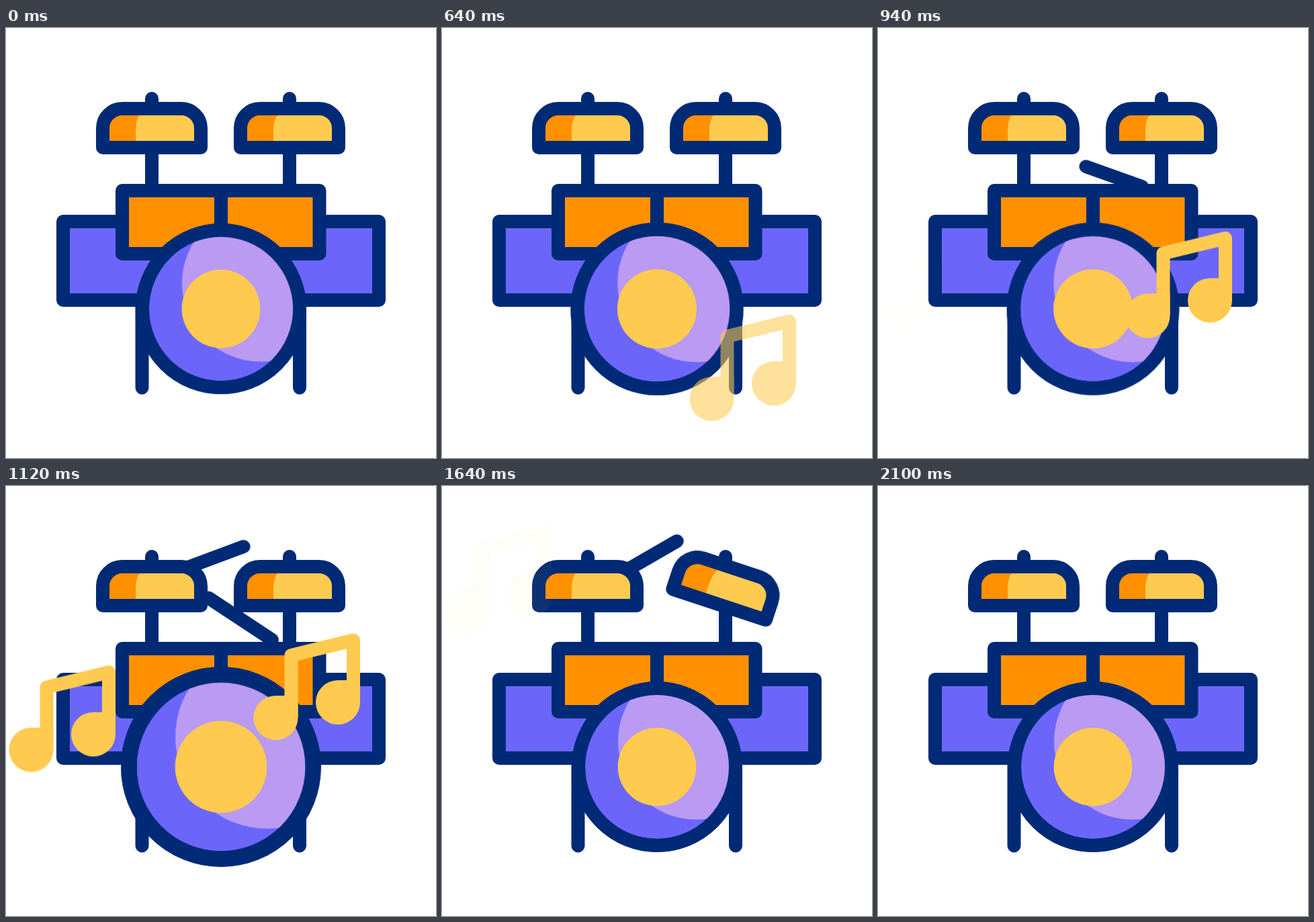
These frames come from a looping animation (640 px wide and 640 px high, 2400 ms). An HTML page:

```html
<!DOCTYPE html>
<html lang="en">
<head>
<meta charset="utf-8">
<title>Drum kit</title>
<style>
  html, body { margin: 0; width: 100%; height: 100%; overflow: hidden; background: #fff; }
  svg { display: block; width: 100%; height: 100%; }

  :root {
    --navy: #002a76;
    --yellow: #fecb50;
    --orange: #ff9100;
    --purple: #6b66f9;
    --lilac: #ba9af2;
    --smooth: cubic-bezier(.33, 0, .67, 1);
  }

  .line { stroke: var(--navy); stroke-width: 20; stroke-linecap: round; stroke-linejoin: round; }
  .tom { fill: var(--orange); }
  .side { fill: var(--purple); }

  .drum, .cymbal, .stick, .stick line, .note, .squash {
    animation: 2.4s var(--smooth) infinite both;
  }

  /* bass drum: three straight in-and-out beats */
  .drum { transform-origin: 320px 418px; animation-name: beat; animation-timing-function: linear; }
  @keyframes beat {
    0%, 13.333%, 26.25%, 39.583%, 52.917%, 100% { transform: scale(1); }
    6.667%, 32.917%, 46.25% { transform: scale(1.185); }
  }

  /* left tom gives way under the lower stick */
  .squash { animation-name: squash; }
  @keyframes squash {
    0%, 51.667%, 60%, 100% { y: 242px; height: 94px; }
    55.833% { y: 268px; height: 68px; }
  }

  /* right cymbal rocks and settles */
  .cymbal { transform-origin: 422px 148px; animation-name: rock; }
  @keyframes rock {
    0%, 54.167% { transform: rotate(0deg); }
    60.833% { transform: rotate(-18deg); }
    68.333% { transform: rotate(18.3deg); }
    75.833% { transform: rotate(-9deg); }
    82.5%, 100% { transform: rotate(0deg); }
  }

  .low { animation-name: low-swing; }
  @keyframes low-swing {
    0%, 39.167% { transform: translate(393px, 236px) rotate(19.6deg); }
    45.833% { transform: translate(396px, 229px) rotate(36deg); }
    51.667% { transform: translate(396px, 229px) rotate(-6deg); }
    55.833%, 100% { transform: translate(396px, 229px) rotate(12.2deg); }
  }
  .low line { stroke-dasharray: 113.5 300; animation-name: low-draw; animation-timing-function: linear; }
  @keyframes low-draw {
    0%, 35.625% { stroke-dashoffset: 113.5; visibility: hidden; }
    35.7% { visibility: visible; }
    40.208%, 60% { stroke-dashoffset: 0; }
    64.1% { visibility: visible; }
    64.167%, 100% { stroke-dashoffset: 113.5; visibility: hidden; }
  }

  .high { animation-name: high-swing; }
  @keyframes high-swing {
    0%, 44.167% { transform: translate(303px, 109px) rotate(-7deg); }
    50% { transform: translate(303px, 109px) rotate(-40deg); }
    55.833% { transform: translate(303px, 109px) rotate(-7deg); }
    68.333%, 100% { transform: translate(303px, 109px) rotate(-30deg); }
  }
  .high line { stroke-dasharray: 108 300; animation-name: high-draw; animation-timing-function: linear; }
  @keyframes high-draw {
    0%, 40.833% { stroke-dashoffset: 108; visibility: hidden; }
    40.9% { visibility: visible; }
    45%, 69.167% { stroke-dashoffset: 0; }
    73.2% { visibility: visible; }
    73.333%, 100% { stroke-dashoffset: 108; visibility: hidden; }
  }

  /* notes rise while fading in and out */
  .note {
    animation-name: rise, fade;
    animation-timing-function: var(--smooth), linear;
    animation-delay: var(--wait);
  }
  .right { --x: 0px; --start: 131.5px; --end: -121.5px; --wait: 0s; }
  .left { --x: -364px; --start: .8px; --end: -245px; --wait: .38s; }
  @keyframes rise {
    0%, 23.333% { transform: translate(var(--x), var(--start)); }
    54.167%, 100% { transform: translate(var(--x), var(--end)); }
  }
  @keyframes fade {
    0%, 23.333% { opacity: 0; }
    29.167%, 47.083% { opacity: 1; }
    52.833%, 100% { opacity: 0; }
  }
</style>
</head>
<body>
<svg viewBox="0 0 640 640">
  <defs>
    <g id="plate">
      <path id="shell" fill="var(--orange)" d="M144 178V149a29 29 0 0 1 29-29H261a29 29 0 0 1 29 29V178Z"/>
      <path fill="var(--yellow)" d="M193 178V152Q193 131 208 120H261a29 29 0 0 1 29 29V178Z"/>
      <path class="line" fill="none" d="M144 178V149a29 29 0 0 1 29-29H261a29 29 0 0 1 29 29V178Z"/>
    </g>
    <path id="head" d="M0-33H33V0A33 33 0 1 1 0-33Z"/>
    <g id="music" fill="var(--yellow)">
      <path d="M424.5 429V336L517 313.5V406" fill="none" stroke="var(--yellow)" stroke-width="20" stroke-linejoin="round"/>
      <use href="#head" x="401.5" y="429"/>
      <use href="#head" x="494" y="406"/>
    </g>
    <clipPath id="skin"><circle cx="320" cy="418" r="112"/></clipPath>
  </defs>

  <g class="stick high"><line class="line" x1="-54" x2="54"/></g>
  <g class="stick low"><line class="line" x1="0" x2="-113.5"/></g>

  <path class="line" d="M217 105V275M422 105V242"/>
  <use href="#plate"/>
  <g class="cymbal"><use href="#plate" x="205"/></g>

  <rect class="line side" x="85" y="288" width="470" height="117"/>
  <rect class="line tom squash" x="173" y="242" width="147" height="94"/>
  <rect class="line tom" x="320" y="242" width="146.5" height="94"/>

  <path class="line" d="M202.500 410V535.500M437 410V535.500"/>
  <g class="drum">
    <circle class="line side" cx="320" cy="418" r="117"/>
    <circle cx="378.500" cy="380" r="116.500" fill="var(--lilac)" clip-path="url(#skin)"/>
    <circle class="line" cx="320" cy="418" r="117" fill="none"/>
    <circle cx="320" cy="418" r="58.300" fill="var(--yellow)"/>
  </g>

  <g class="note right"><use href="#music"/></g>
  <g class="note left"><use href="#music"/></g>
</svg>
</body>
</html>
```
